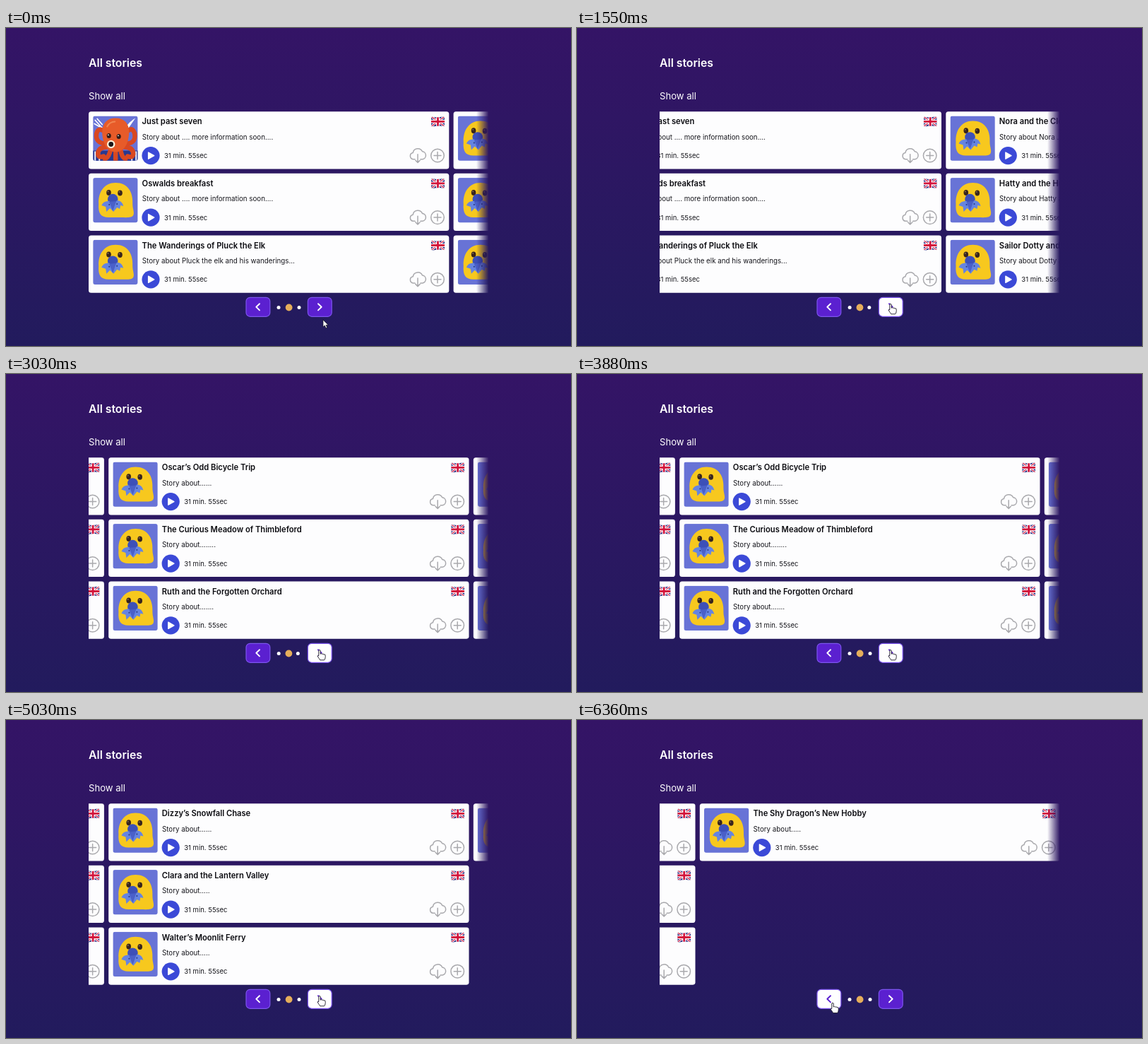
Recreate the animation shown at these times as an HTML page. Size 800 by 450 pixels, loop 6.39 s.

```html
<!DOCTYPE html>
<html lang="en">
<head>
<meta charset="utf-8">
<title>All stories</title>
<style>
  html, body { margin: 0; width: 100%; height: 100%; overflow: hidden; background: #2c185f; }
  svg { display: block; width: 100vw; height: 100vh; }
  text { font-family: Inter, "Open Sans", sans-serif; }
  .title { font-size: 11.2px; font-weight: 600; fill: #0b0b10; }
  .body { font-size: 9.75px; fill: #16161c; }
  .time { font-size: 9.5px; fill: #16161c; }
  .icon { fill: none; stroke: #a9a9ad; stroke-width: 1.5; stroke-linecap: round; stroke-linejoin: round; }
</style>
</head>
<body>
<svg viewBox="0 0 800 450">
  <defs>
    <linearGradient id="sky" x2="0" y2="1">
      <stop stop-color="#341466"/><stop offset="1" stop-color="#221b5d"/>
    </linearGradient>
    <linearGradient id="fade" gradientUnits="userSpaceOnUse" x1="666" x2="683.5">
      <stop stop-color="#fff"/><stop offset="1" stop-color="#000"/>
    </linearGradient>
    <mask id="view" maskUnits="userSpaceOnUse" x="117" y="110" width="567" height="270">
      <rect x="117" y="110" width="566.5" height="270" fill="url(#fade)"/>
    </mask>
    <clipPath id="frame"><rect width="63.2" height="63.2" rx="3"/></clipPath>
    <clipPath id="flagShape"><path d="M0 2Q0 .2 2 .5Q9 2 16 .4Q19 0 19 2V12Q19 14 17 13.6Q10 12.6 3 14Q0 14.4 0 12Z"/></clipPath>

    <g id="bird" clip-path="url(#frame)">
      <rect width="64" height="64" fill="#6873d6"/>
      <path d="M8 37C7 20 16 7 32 7C49 7 57 20 56 37C56 44 59 49 57 53C55 57 47 56 39 56H22C11 56 7 50 8 37Z" fill="#f7c81e"/>
      <ellipse cx="22.3" cy="20.8" rx="3.3" ry="4" fill="#38251d"/>
      <ellipse cx="38.3" cy="21.3" rx="3.3" ry="4" fill="#38251d"/>
      <circle cx="21.3" cy="19.3" r=".9" fill="#8f7357"/><circle cx="37.3" cy="19.8" r=".9" fill="#8f7357"/>
      <circle cx="28" cy="30" r="7.3" fill="#3d50b8"/>
      <path d="M12 39Q15 32 23 33L28 38L34 32Q41 32 43 40L39 39L38 44L34 42L29 48L24 43L19 48L18 41Z" fill="#6584e0"/>
      <path d="M23 34L28 47L33 33Z" fill="#4a60c9"/>
      <circle cx="23" cy="38" r="1" fill="#26367f"/><circle cx="34" cy="37" r="1" fill="#26367f"/>
    </g>

    <g id="octopus" clip-path="url(#frame)">
      <rect width="64" height="64" fill="#6873d6"/>
      <path d="M0 49H64V64H0Z" fill="#29388f"/>
      <path d="M3 50V64M9 46V64M55 46V64M61 50V64" stroke="#e9edff" stroke-width="2"/>
      <path d="M3 6L13 17M6 4L13 12M2 11L9 15M11 15L17 25" stroke="#fff" stroke-width="1.7" stroke-linecap="round"/>
      <path d="M60 3Q51 8 46 17L49 19Z" fill="#fff"/>
      <g fill="none" stroke="#d94821" stroke-width="6.5" stroke-linecap="round">
        <path d="M17 39Q3 38 5 25Q7 17 13 20"/><path d="M47 39Q61 39 59 25Q56 16 51 20"/>
        <path d="M20 44Q7 44 7 54Q8 60 15 57"/><path d="M44 44Q57 44 57 54Q56 60 49 57"/>
        <path d="M25 47Q23 58 17 61"/><path d="M39 47Q40 58 46 61"/><path d="M32 47V62"/>
      </g>
      <path d="M13 23C13 10 20 3 32 3C45 3 51 11 51 23C51 33 47 51 32 51C18 51 13 34 13 23Z" fill="#e75b29"/>
      <path d="M20 15Q24 8 31 8" fill="none" stroke="#f18650" stroke-width="2" stroke-linecap="round"/>
      <ellipse cx="22.5" cy="28" rx="3" ry="3.5" fill="#321c18"/><ellipse cx="36.5" cy="29" rx="3" ry="3.5" fill="#321c18"/>
      <circle cx="21.7" cy="26.8" r=".9" fill="#fff"/><circle cx="35.7" cy="27.8" r=".9" fill="#fff"/>
      <circle cx="25.5" cy="40" r="5.7" fill="#fff1db"/><circle cx="25.5" cy="40" r="3.4" fill="#1b1719"/>
    </g>

    <g id="flag" clip-path="url(#flagShape)">
      <rect width="19" height="15" fill="#24257c"/>
      <path d="M0 0L19 14M19 0L0 14" stroke="#fff" stroke-width="3"/>
      <path d="M0 0L19 14M19 0L0 14" stroke="#d3143c" stroke-width="1.1"/>
      <path d="M9.5 0V15M0 7.1H19" stroke="#fff" stroke-width="5"/>
      <path d="M9.5 0V15M0 7.1H19" stroke="#d3143c" stroke-width="2.8"/>
    </g>

    <g id="cardBase">
      <rect width="510.3" height="81.3" rx="3.5" fill="#fdfdfe"/>
      <circle cx="88" cy="62.4" r="12.6" fill="#3b49d7"/>
      <path d="M84.6 57.8V67L92.7 62.4Z" fill="#fff" stroke="#fff" stroke-width="1.4" stroke-linejoin="round"/>
      <text class="time" x="107" y="65.8">31 min. 55sec</text>
      <path class="icon" d="M462 67.5H459.5A4.6 4.6 0 0 1 459.2 58.4A7 7 0 0 1 472.5 56.6A5.5 5.5 0 0 1 472.8 67.5H470M466 60.5V72M462.8 69L466 72.2L469.2 69"/>
      <path class="icon" d="M494 57.3V67.3M489 62.3H499"/><circle class="icon" cx="494" cy="62.3" r="9.3"/>
      <use href="#flag" x="485" y="7"/>
    </g>
  </defs>

  <rect width="800" height="450" fill="url(#sky)"/>
  <text x="117" y="54.6" font-size="15.8" font-weight="600" fill="#fff">All stories</text>
  <text x="117" y="100.8" font-size="13.1" fill="#fff">Show all</text>
  <g mask="url(#view)"><g id="track"></g></g>

  <g id="prev">
    <rect x="340" y="381.3" width="33.8" height="27" rx="5.5" stroke="#7d55ee" stroke-width="1.2"/>
    <path d="M359 390.2L354.3 394.8L359 399.4" fill="none" stroke-width="1.9" stroke-linecap="round" stroke-linejoin="round"/>
  </g>
  <g id="next">
    <rect x="427.4" y="381.3" width="33.8" height="27" rx="5.5" stroke="#7d55ee" stroke-width="1.2"/>
    <path d="M442 390.2L446.7 394.8L442 399.4" fill="none" stroke-width="1.9" stroke-linecap="round" stroke-linejoin="round"/>
  </g>
  <circle id="dotLeft" cy="395.5" r="2.5" fill="#fff"/>
  <circle id="dotMain" cy="395.5" r="4.9" fill="#e5ae5b"/>
  <circle id="dotRight" cy="395.5" r="2.5" fill="#fff"/>

  <g id="cursor" stroke-linejoin="round">
    <path id="arrow" d="M0 0V10L2.3 8L4 11.7L5.7 11L4.1 7.4H7.2Z" fill="#fff" stroke="#15131d" stroke-width=".7"/>
    <path id="hand" d="M-1.2 1Q0-.8 1.2 1V6Q2.5 4.7 3.6 6.2Q5 5.2 6 6.7Q8.3 6 8.2 8.3V10.5Q8 13 6.7 14.6H.7Q-.7 12.2-2.6 9.7Q-3.2 7.7-1.2 8.4Z" fill="#fff" stroke="#1b1924" stroke-width=".9"/>
  </g>
</svg>
<script>
const LOOP = 6390;
const PITCH = 516.6;
const CENTER = 145.2;
const stops = [117, CENTER - PITCH, CENTER - 2 * PITCH, CENTER - 3 * PITCH, 173.8 - 4 * PITCH];
const clicks = [1500, 2715, 3960, 5150];
const SLIDE = 300;
const about = dots => 'Story about' + '.'.repeat(dots);
const soon = 'Story about .... more information soon....';

const stories = [
  ['Just past seven', soon],
  ['Oswalds breakfast', soon],
  ['The Wanderings of Pluck the Elk', 'Story about Pluck the elk and his wanderings...'],
  ['Nora and the Cloudy Sea', 'Story about Nora ...'],
  ['Hatty and the Humming Kettles', 'Story about Hatty and Kettles...'],
  ['Sailor Dotty and the Hidden Cove', 'Story about Dotty and the cove...'],
  ['Oscar’s Odd Bicycle Trip', about(6)],
  ['The Curious Meadow of Thimbleford', about(8)],
  ['Ruth and the Forgotten Orchard', about(7)],
  ['Dizzy’s Snowfall Chase', about(6)],
  ['Clara and the Lantern Valley', about(5)],
  ['Walter’s Moonlit Ferry', about(5)],
  ['The Shy Dragon’s New Hobby', about(5)]
];

const el = id => document.getElementById(id);
const clamp = x => Math.max(0, Math.min(1, x));
const mix = (a, b, p) => a + (b - a) * p;
const smooth = x => x * x * (3 - 2 * x);

el('track').innerHTML = stories.map(([title, body], i) => `
  <g transform="translate(${Math.floor(i / 3) * PITCH} ${118.2 + (i % 3) * 87.6})">
    <use href="#cardBase"/>
    <use href="#${i ? 'bird' : 'octopus'}" x="6.2" y="6.3"/>
    <text class="title" x="75.6" y="18.3">${title}</text>
    <text class="body" x="75.8" y="39.6">${body}</text>
  </g>`).join('');

// CSS "ease": cubic-bezier(.25, .1, .25, 1)
function ease(x) {
  if (x <= 0 || x >= 1) return clamp(x);
  const curve = (a, b, s) => 3 * a * s * (1 - s) ** 2 + 3 * b * s * s * (1 - s) + s ** 3;
  let low = 0, high = 1;
  for (let i = 0; i < 24; i++) {
    const mid = (low + high) / 2;
    if (curve(.25, .25, mid) < x) low = mid; else high = mid;
  }
  return curve(.1, 1, low);
}

function trackX(t) {
  return clicks.reduce((x, start, i) =>
    x + (stops[i + 1] - stops[i]) * ease((t - start) / SLIDE), stops[0]);
}

// The dots draw together after a click and settle more slowly than the cards.
function dotPull(t) {
  return clicks.reduce((sum, start) => {
    const age = t - start;
    if (age <= 0 || age >= 520) return sum;
    return sum + (age < 180 ? smooth(age / 180) : (1 - (age - 180) / 340) ** 2.5);
  }, 0);
}

function pointer(t) {
  const enter = 1 - (1 - clamp(t / 440)) ** 2;
  const leave = smooth(clamp((t - 5950) / 405));
  return [
    mix(mix(449, 444, enter), 362, leave),
    mix(mix(413, 390.2, enter), 400, leave)
  ];
}

function paintButton(id, hover) {
  const [box, chevron] = el(id).children;
  box.setAttribute('fill', hover ? '#fff' : '#5b20d0');
  chevron.setAttribute('stroke', hover ? '#5b20d0' : '#fff');
}

function render(t) {
  el('track').setAttribute('transform', `translate(${trackX(t)} 0)`);

  const pull = dotPull(t);
  el('dotLeft').setAttribute('cx', 386 + .7 * pull);
  el('dotMain').setAttribute('cx', 400.6 - .8 * pull);
  el('dotRight').setAttribute('cx', 415 - 6 * pull);

  const [x, y] = pointer(t);
  const over = left => x > left && x < left + 34 && y < 408.5;
  const onPrev = over(340), onNext = over(427.4);
  paintButton('prev', onPrev);
  paintButton('next', onNext);
  el('cursor').setAttribute('transform', `translate(${x} ${y})`);
  el('hand').style.display = onPrev || onNext ? '' : 'none';
  el('arrow').style.display = onPrev || onNext ? 'none' : '';
}

const begin = performance.now();
function tick(now) {
  render(Math.max(0, now - begin) % LOOP);
  requestAnimationFrame(tick);
}
render(0);
requestAnimationFrame(tick);
</script>
</body>
</html>
```
